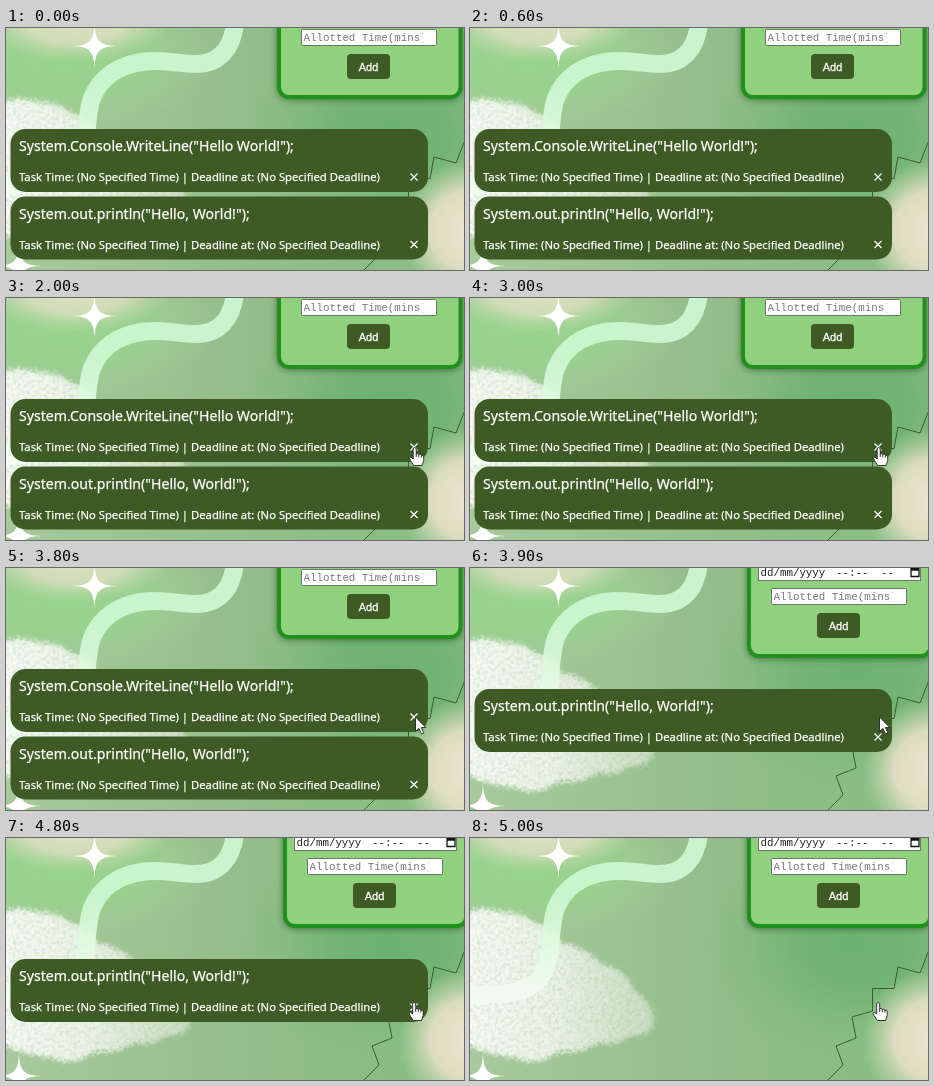
An HTML page that plays this animation: 458 by 242 pixels, repeating every 5100 ms.

```html
<!DOCTYPE html>
<html lang="en">
<head>
<meta charset="utf-8">
<style>
html, body { margin: 0; width: 100%; height: 100%; overflow: hidden; background: #92bd88; }
svg { display: block; width: 458px; height: 242px; }
.card { fill: #fff; font-family: "Noto Sans", sans-serif; }
.card rect { fill: #3f5b25; }
.card text { stroke: #fff; stroke-width: .25; }
.title { font-size: 14.1px; }
.info { font-size: 11.28px; }
.cross { fill: none; stroke: #fff; stroke-width: 1.2; }
.field { fill: #fff; stroke: #6d756b; }
.mono { font: 10.8px "Liberation Mono", monospace; fill: #222; }
.hint { fill: #777; }
.add { font: 11px "Liberation Sans", sans-serif; fill: #fff; stroke: #fff; stroke-width: .3; text-anchor: middle; }
</style>
</head>
<body>
<svg viewBox="0 0 458 242">
  <defs>
    <linearGradient id="base">
      <stop offset="0" stop-color="#a6ca9b"/>
      <stop offset=".35" stop-color="#9bc191"/>
      <stop offset=".55" stop-color="#92bd8a"/>
      <stop offset="1" stop-color="#86be82"/>
    </linearGradient>
    <radialGradient id="leaf">
      <stop offset="0" stop-color="#6cb16f"/>
      <stop offset=".4" stop-color="#70b372" stop-opacity=".85"/>
      <stop offset="1" stop-color="#80ba7d" stop-opacity="0"/>
    </radialGradient>
    <radialGradient id="cream">
      <stop offset="0" stop-color="#efe5cf"/>
      <stop offset=".55" stop-color="#e6e0c8" stop-opacity=".9"/>
      <stop offset="1" stop-color="#d0dab4" stop-opacity="0"/>
    </radialGradient>
    <radialGradient id="mint">
      <stop offset="0" stop-color="#98d58e"/>
      <stop offset=".55" stop-color="#98d28d" stop-opacity=".85"/>
      <stop offset="1" stop-color="#a4cf99" stop-opacity="0"/>
    </radialGradient>
    <linearGradient id="mist">
      <stop offset="0" stop-color="#f8faf7"/>
      <stop offset=".5" stop-color="#eff4ec" stop-opacity=".95"/>
      <stop offset="1" stop-color="#dfe9d9" stop-opacity=".7"/>
    </linearGradient>
    <linearGradient id="ribbon" gradientUnits="userSpaceOnUse" x1="0" y1="60" x2="0" y2="150">
      <stop offset="0" stop-color="#cdf8d2"/>
      <stop offset="1" stop-color="#f1fbf0"/>
    </linearGradient>
    <filter id="fluff" x="-10%" y="-10%" width="120%" height="120%" color-interpolation-filters="sRGB">
      <feTurbulence type="fractalNoise" baseFrequency=".28" numOctaves="2" seed="4" result="noise"/>
      <feGaussianBlur in="SourceGraphic" stdDeviation="2"/>
      <feDisplacementMap in2="noise" scale="9" xChannelSelector="R" yChannelSelector="G" result="shape"/>
      <feColorMatrix in="noise" values="0 0 0 0 1  0 0 0 0 1  0 0 0 0 1  .8 0 0 0 .5"/>
      <feComposite in="shape" operator="in"/>
    </filter>
    <filter id="shadow" x="-10%" y="-10%" width="120%" height="130%">
      <feDropShadow dx="0" dy="1" stdDeviation="3" flood-color="#1d3a1b" flood-opacity=".6"/>
    </filter>
    <clipPath id="hintClip"><path d="M296 0h120.700v20h-120.700z"/></clipPath>
    <path id="star" d="M0-23C.6-5 5-.6 22 0C5 .6 .6 5 0 23C-.6 5-5 .6-22 0C-5-.6-.6-5 0-23z" fill="#fff"/>
  </defs>

  <rect width="458" height="242" fill="url(#base)"/>
  <ellipse cx="385" cy="105" rx="150" ry="120" fill="url(#leaf)"/>
  <ellipse cx="60" cy="30" rx="150" ry="70" fill="url(#mint)"/>
  <ellipse cx="70" cy="-8" rx="95" ry="42" fill="url(#cream)" opacity=".8"/>
  <circle cx="464" cy="202" r="72" fill="url(#cream)"/>
  <path filter="url(#fluff)" fill="url(#mist)" d="M-10 75Q12 68 32 74Q54 75 66 85Q84 90 92 105Q116 108 130 125Q156 130 164 152Q184 165 184 184Q182 199 160 198Q146 209 128 205Q108 217 88 214Q66 230 46 220Q20 218 -10 204z"/>
  <path d="M229-4C226 20 214 36 190 36C172 36 158 31 138 33.500C112 37 94 50 86 70C78 92 84 120 70 140C58 156 30 157 -8 157" fill="none" stroke="url(#ribbon)" stroke-width="18" opacity=".92"/>
  <use href="#star" x="88.5" y="18"/>
  <use href="#star" x="13" y="238"/>
  <path d="M459 112L450 135L428 129L424 150.500L402.500 150.500L402.500 173L382 179L386 200L366 208L373 227L358 242" fill="none" stroke="#41592f"/>

  <g id="form">
    <rect x="273" y="-160" width="181.500" height="229" rx="10" fill="#8fd17d" stroke="#21901f" stroke-width="4" filter="url(#shadow)"/>
    <rect class="field" x="282.500" y="-24.500" width="162" height="18"/>
    <g class="mono">
      <text x="284.500" y="-11">dd/mm/yyyy</text>
      <text x="360" y="-11">--:--</text>
      <text x="405" y="-11">--</text>
    </g>
    <path d="M435-18.500h8v8h-8zm0 1.500h8" fill="none" stroke="#111" stroke-width="1.300"/>
    <rect class="field" x="295.500" y="1.500" width="135" height="16" rx="1"/>
    <text class="mono hint" x="297.500" y="13" clip-path="url(#hintClip)">Allotted Time(mins)</text>
    <rect x="341" y="26" width="43" height="25" rx="4" fill="#3f5b25"/>
    <text class="add" x="362.500" y="42.500">Add</text>
  </g>

  <g id="cards"></g>

  <g id="pointer" stroke="#222" stroke-width=".9" stroke-linejoin="round" fill="#fff">
    <path id="arrow" d="M0 0V14.500L3.400 11.400L6 17L8.400 15.900L5.900 10.500H10.300z"/>
    <path id="hand" d="M-2.300 1.500Q-.8-.7.700 1.500V7Q2.200 5.800 3.300 7.400Q4.900 6.500 5.800 8.200Q8 7.500 8.200 9.800V13.500L6.500 18.500H-1.600L-5 13.500Q-6.800 10.500-4.800 10L-2.300 12zM.700 7v3M3.300 7.400v3M5.800 8.200v2.500"/>
  </g>
</svg>
<script>
const LOOP = 5100, FIRST_GONE = 3900, SECOND_GONE = 4900;
const $ = id => document.getElementById(id);
const show = (el, on) => el.style.display = on ? '' : 'none';
const place = (el, x, y) => el.setAttribute('transform', `translate(${x} ${y})`);

const cards = ['System.Console.WriteLine("Hello World!");', 'System.out.println("Hello, World!");'].map(title => {
  const card = document.createElementNS('http://www.w3.org/2000/svg', 'g');
  card.setAttribute('class', 'card');
  card.innerHTML = `<rect x="4.500" width="417.500" height="63" rx="15"/>
    <text class="title" x="13" y="22">${title}</text>
    <text class="info" x="13" y="52">Task Time: (No Specified Time) | Deadline at: (No Specified Deadline)</text>
    <path class="cross" d="M404.500 44.500l7 7m0-7l-7 7"/>`;
  return $('cards').appendChild(card);
});
place(cards[0], 0, 101);

// Pointer stops: time, x, y
const stops = [[700, 460, 112], [1100, 420, 130], [1600, 409.5, 149], [4100, 409.5, 149], [4600, 409, 164], [LOOP, 409, 164]];

function pointerAt(t) {
  const i = stops.findIndex(stop => stop[0] > t);
  const [t0, x0, y0] = stops[i - 1], [t1, x1, y1] = stops[i];
  const k = (t - t0) / (t1 - t0);
  return [x0 + (x1 - x0) * k, y0 + (y1 - y0) * k];
}

function draw(now) {
  const t = Math.floor(now % LOOP / 100) * 100;
  const firstGone = t >= FIRST_GONE;
  show(cards[0], !firstGone);
  show(cards[1], t < SECOND_GONE);
  place(cards[1], 0, firstGone ? 121 : 168.5);
  place($('form'), firstGone ? 6 : 0, firstGone ? 19 : 0);

  const hovering = t >= 1500 && t < 3700 || t >= 4500;
  show($('pointer'), t >= stops[0][0]);
  show($('hand'), hovering);
  show($('arrow'), !hovering);
  if (t >= stops[0][0]) place($('pointer'), ...pointerAt(t));
  requestAnimationFrame(() => draw(performance.now()));
}
draw(performance.now());
</script>
</body>
</html>
```
